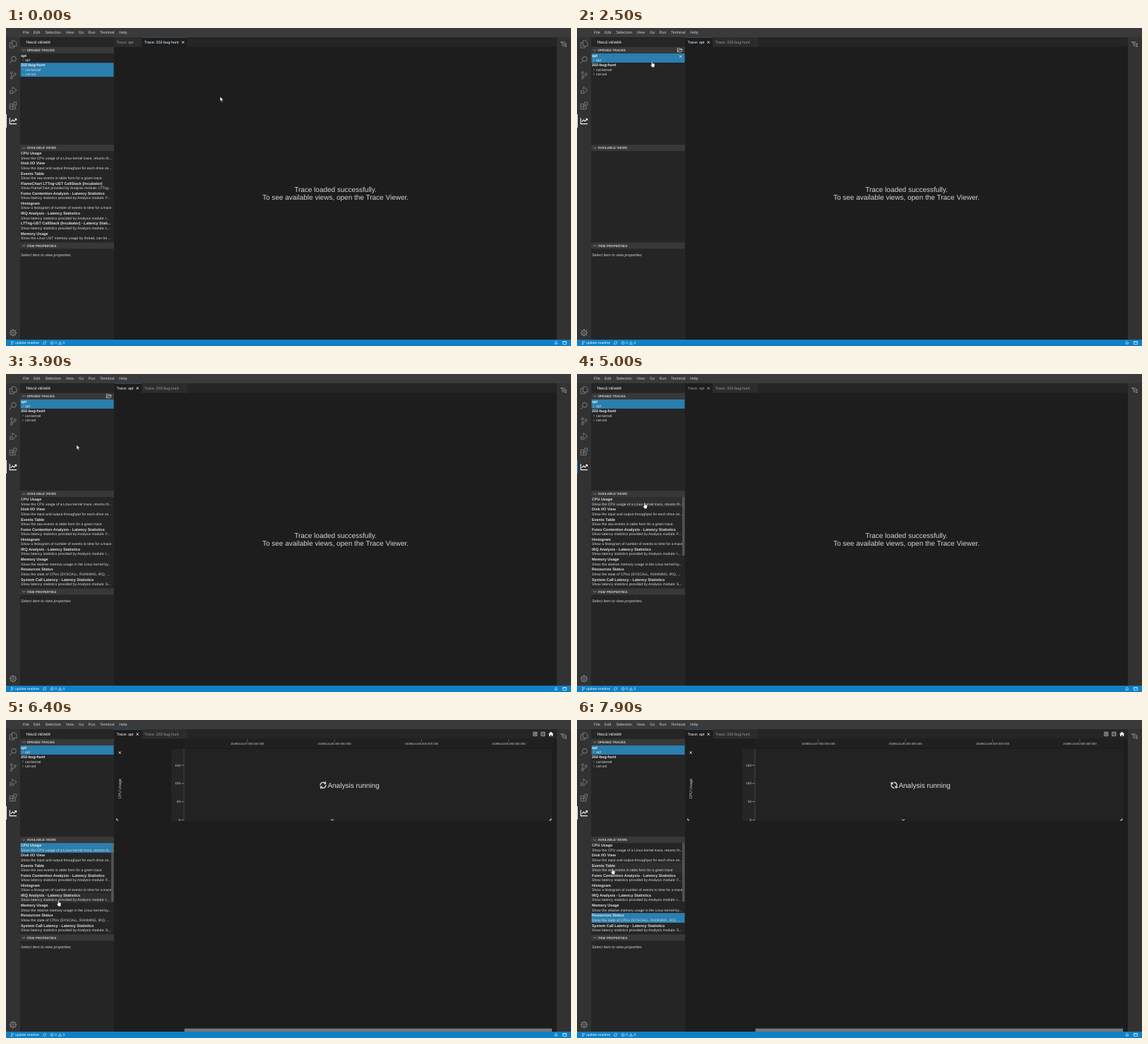
Write an HTML page that moves like this. It is 800 px wide and 450 px high and loops after 8000 ms.

```html
<!DOCTYPE html>
<html lang="en">
<head>
<meta charset="utf-8">
<title>Trace viewer</title>
<style>
html, body { margin: 0; width: 100%; height: 100%; overflow: hidden; background: #1e1d1e; }
svg { display: block; width: 100vw; height: 100vh; }
text { font-family: "Liberation Sans", Arial, sans-serif; white-space: pre; text-rendering: geometricPrecision; }
</style>
</head>
<body>
<svg id="stage" viewBox="0 0 800 450"></svg>
<script>
const LOOP = 8000;
const SELECT = '#2a7fae', HOVER = '#2c2e2f', PALE = '#cfcfcf', WHITE = '#f2f2f2';
const LIST_TOP = 173.9, ROW = 14.17;

// y is the vertical middle of the capitals
const text = (x, y, s, size = 5.42, fill = PALE, extra = '') =>
  `<text x="${x}" y="${(y + size * 0.36).toFixed(2)}" font-size="${size}" fill="${fill}" ${extra}>${s}</text>`;
const rect = (x, y, w, h, fill, extra = '') =>
  `<rect x="${x}" y="${y}" width="${w}" height="${h}" fill="${fill}" ${extra}/>`;
const line = (d, stroke = '#8a8a8a', width = 0.8, extra = '') =>
  `<path d="${d}" fill="none" stroke="${stroke}" stroke-width="${width}" ${extra}/>`;
const group = (id, body, extra = '') => `<g id="${id}" ${extra}>${body}</g>`;
const at = (x, y, body) => `<g transform="translate(${x} ${y})">${body}</g>`;
const cross = (x, y, r = 1.7, id = '') =>
  line(`M${x - r} ${y - r}l${2 * r} ${2 * r}m0 ${-2 * r}l${-2 * r} ${2 * r}`, WHITE, 0.9, id);
const BOLD = 'font-weight="bold"', MIDDLE = 'text-anchor="middle"';

function header(y, title) {
  return rect(20, y, 133, 9, '#383838') +
    line(`M23.2 ${y + 3.6}l2 2l2 -2`, '#c5c5c5', 0.6) +
    text(29.5, y + 4.5, title, 4.58, '#cccccc', BOLD);
}

function viewList(id, items) {
  return group(id, items.map(([name, about], i) => {
    const y = 177.3 + i * ROW;
    return text(21, y, name, 5.42, '#e4e4e4', BOLD) + text(21, y + 6.4, about, 5.1, '#dadada');
  }).join(''));
}

const cpu = ['CPU Usage', 'Show the CPU usage of a Linux kernel trace, returns th...'];
const disk = ['Disk I/O View', 'Show the input and output throughput for each drive on...'];
const events = ['Events Table', 'Show the raw events in table form for a given trace'];
const futex = ['Futex Contention Analysis - Latency Statistics', 'Show latency statistics provided by Analysis module: F...'];
const histogram = ['Histogram', 'Show a histogram of number of events to time for a trace'];
const irq = ['IRQ Analysis - Latency Statistics', 'Show latency statistics provided by Analysis module: I...'];
const huntViews = [cpu, disk, events,
  ['FlameChart LTTng-UST CallStack (Incubator)', 'Show FlameChart provided by Analysis module: LTTng...'],
  futex, histogram, irq,
  ['LTTng-UST CallStack (Incubator) - Latency Stati...', 'Show latency statistics provided by Analysis module: L...'],
  ['Memory Usage', 'Show the Linux UST memory usage by thread, can be ...']];
const aptViews = [cpu, disk, events, futex, histogram, irq,
  ['Memory Usage', 'Show the relative memory usage in the Linux kernel by...'],
  ['Resources Status', 'Show the state of CPUs (SYSCALL, RUNNING, IRQ, ...'],
  ['System Call Latency - Latency Statistics', 'Show latency statistics provided by Analysis module: S...']];

function chrome() {
  const menu = [[24, 'File'], [39, 'Edit'], [55.5, 'Selection'], [84.5, 'View'],
    [103, 'Go'], [116.5, 'Run'], [133, 'Terminal'], [160.3, 'Help']];
  return rect(0, 0, 800, 450, '#1e1d1e') + rect(0, 0, 800, 13, '#3b3a3b') +
    menu.map(([x, s]) => text(x, 6.4, s)).join('') +
    rect(0, 13, 20, 428, '#333233') + rect(780, 13, 20, 428, '#333233') +
    rect(20, 13, 133, 428, '#252526') + rect(153, 13, 627, 13.6, '#252526') +
    text(28, 19.9, 'TRACE VIEWER', 4.58, '#e2e2e2', 'stroke="#e2e2e2" stroke-width=".12"');
}

function activityIcons() {
  const gear = Array.from({ length: 8 }, (_, i) =>
    `<path d="M0 -3.3V-5" stroke="#8a8a8a" stroke-width="1.5" transform="rotate(${i * 45})"/>`).join('');
  return at(10, 23, line('M-1.5 -5h4l2.5 2.5v5h-6.5zM-2 -2.5h-2.7v7.5h6.2v-2')) +
    at(10, 45, '<circle cx="1" cy="-1.2" r="3.4" fill="none" stroke="#8a8a8a" stroke-width=".9"/>' + line('M-1.4 1.4L-5 5', '#8a8a8a', 1)) +
    at(10, 67, [[-2.2, -3.8], [-2.2, 3.8], [2.8, -1.8]].map(([x, y]) =>
      `<circle cx="${x}" cy="${y}" r="1.4" fill="none" stroke="#8a8a8a" stroke-width=".8"/>`).join('') +
      line('M-2.2 -2.4v4.8M2.8 -.4q0 2 -5 1.8')) +
    at(10, 88.5, line('M-1 -1.5v-3.5l6 4.5l-4.5 3.5') +
      '<circle cx="-2.2" cy="2" r="2" fill="none" stroke="#8a8a8a" stroke-width=".8"/>' +
      line('M-5 0l1.2 .8M-5 2.4h1M-5 4.8l1.3 -1M.6 4.8l-1.2 -1')) +
    at(10, 110, line('M-4.8 -2.6h4.2v7.4h-4.2zM-4.8 1h8v3.8h-4M.8 -5h4v4h-4z')) +
    at(10, 131.5, line('M-4.7 -4.2v8.3h9.7', WHITE, 1.1) + line('M-3 1.2l2.4 -2.6l2 1.8l3 -3.2M2.3 -3h2.3v2.3', WHITE, 1.2)) +
    at(10, 431.2, gear + '<circle r="3.6" fill="none" stroke="#8a8a8a" stroke-width=".8"/><circle r="1.4" fill="none" stroke="#8a8a8a" stroke-width=".8"/>') +
    at(790, 23, line('M-4 -3h6M-2 -3v5.2h4M-2 -.4h4', '#8a8a8a', 0.9) +
      [[-3.6, -3], [2.6, -.4], [2.6, 2.6]].map(([x, y]) => rect(x - .9, y - .9, 2, 2, '#8a8a8a')).join(''));
}

function statusBar() {
  return rect(0, 441, 800, 9, '#0f80c5') +
    at(9, 445.6, line('M-1 -2v4M-1 .8q2.3 0 2.3 -2', WHITE, 0.5) +
      [[-1, -2], [-1, 2], [1.3, -1.5]].map(([x, y]) => `<circle cx="${x}" cy="${y}" r=".65" fill="${WHITE}"/>`).join('')) +
    text(13, 445.6, 'update-readme', 5, WHITE) +
    at(54.6, 445.6, line('M-2 .4a2 2 0 0 1 3.5 -1.6M2 -.4a2 2 0 0 1 -3.5 1.6M1.8 -2v1.2h-1.2M-1.8 2v-1.2h1.2', WHITE, 0.5)) +
    at(65.2, 445.6, `<circle r="2.1" fill="none" stroke="${WHITE}" stroke-width=".5"/>` + line('M-.8 -.8l1.6 1.6m0 -1.6l-1.6 1.6', WHITE, 0.5)) +
    text(69.2, 445.6, '0', 5, WHITE) +
    at(76.4, 445.6, line('M0 -2l2.3 4h-4.6zM0 -.6v1.4', WHITE, 0.5)) +
    text(80.4, 445.6, '0', 5, WHITE) +
    at(778.8, 445.5, line('M-2 1.3q.7 -.7 .7 -2a1.3 1.3 0 0 1 2.6 0q0 1.3 .7 2zM-.5 2.2h1', WHITE, 0.6)) +
    at(791, 445.5, line('M-2.6 -1.9h5.2v3.9h-5.2zM-2.6 -1.2h5.2', WHITE, 0.7));
}

function tabs() {
  const tab = (id, x, w, title, closeX) => rect(x, 13, w, 13.6, '#2d2c2d', `id="${id}Bg"`) +
    rect(x, 13, w, 0.5, SELECT, `id="${id}Top"`) +
    text(x + 3.4, 20, title, 5.42, PALE, `id="${id}Text"`) + cross(closeX, 20.2, 1.6, `id="${id}Close"`);
  return tab('apt', 153, 39, 'Trace: apt', 186.2) + tab('hunt', 192.4, 63.6, 'Trace: 202-bug-hunt', 250.6);
}

function tree() {
  const leaf = (y, s) => line(`M23.2 ${y - 1.3}l1.3 1.3l-1.3 1.3`, '#d0d0d0', 0.5) + text(27, y, s, 5.1, '#dedede');
  return rect(20.5, 36, 132, 13, SELECT, 'id="traceSel"') +
    text(21, 39.2, 'apt', 5.42, '#ececec', BOLD) + leaf(45.4, 'apt') +
    text(21, 52.3, '202-bug-hunt', 5.42, '#ececec', BOLD) + leaf(58.8, 'cat-kernel') + leaf(65.4, 'cat-ust') +
    group('folder', line('M142.3 33.8v-5.2h2.4l.8 .9h3v1.3M142.3 33.8l1.6 -3h5.4l-1.6 3z', '#d8d8d8', 0.7)) +
    group('closeTrace', cross(146.6, 40.3, 1.6));
}

function chart() {
  const times = [147, 148, 149, 150].map((n, i) => {
    const x = 341.6 + i * 123.4;
    return line(`M${x} 26.8v4.4`, '#777', 0.6) +
      text(x, 33.7, `1538614${n}.000 000 000`, 4.17, '#cfcfcf', MIDDLE);
  }).join('');
  const scale = [150, 100, 50, 0].map((n, i) => {
    const y = 64 + i * 25.8;
    return text(247, y, n, 4.7, '#d8d8d8', 'text-anchor="end"') + line(`M248.2 ${y}h3.4`, '#c8c8c8', 0.6);
  }).join('');
  const box = x => line(`M${x - 2.5} 17.3h5v5h-5zM${x - 1.3} 19.8h2.6`, WHITE, 0.7);
  return rect(153, 26.6, 627, 414, '#1e1d1e') +
    rect(252.4, 26.6, 521, 12.2, '#212021') + times +
    rect(234, 41, 539, 102, '#232223') + rect(234, 41, 18.4, 102, '#262526') +
    rect(250.4, 41, 2.4, 102, '#2b3436', 'id="axisBar"') +
    group('scale', line('M252 41v101', '#5d6264', 0.5) + scale) +
    cross(161.2, 46.2, 1.7) +
    text(0, 0, 'CPU Usage', 5.42, '#d6d6d6', `${MIDDLE} transform="translate(161.2 97.3) rotate(-90)"`) +
    line('M156.8 139.2v2.6h2.3M771.7 139.2v2.6h-2.6', WHITE, 0.9) +
    line('M460 140.4l2 1.8l2 -1.8', WHITE, 0.9) +
    text(455.4, 92.4, 'Analysis running', 10, '#dddddd') +
    group('spinner', ['', 'rotate(180)'].map(r => `<g transform="${r}">` +
      line('M-3.9 -.8A4 4 0 0 1 3 -2.7', '#dddddd', 1.4) +
      '<path d="M4.9 -4.6V-.6H.9z" fill="#dddddd"/></g>').join('')) +
    box(749.3) + line('M749.3 18.5v2.6', WHITE, 0.7) + box(760.3) +
    `<path d="M771.6 16.6l3.7 3.5h-1.1v2.8h-1.8v-2h-1.6v2h-1.8v-2.8h-1.1z" fill="${WHITE}"/>` +
    rect(252.6, 436.6, 520.4, 4.4, '#787778');
}

const pointers =
  group('arrow', '<path d="M0 0V6.2L1.5 4.9L2.6 7.5L3.6 7L2.5 4.6H4.4Z" fill="#fff" stroke="#111" stroke-width=".3"/>') +
  group('hand', '<path d="M1.4 .6Q2.1 -.2 2.7 .6V3L5.2 3.6Q6 3.9 5.8 5L5.3 8.6H2L.1 5.6Q-.1 4.6 .8 4.8L1.4 5.3Z" fill="#fff" stroke="#111" stroke-width=".35"/>');

document.getElementById('stage').innerHTML = chrome() + tabs() +
  text(466.5, 228.2, 'Trace loaded successfully.', 10, '#d4d4d4', MIDDLE) +
  text(466.5, 239.7, 'To see available views, open the Trace Viewer.', 10, '#d4d4d4', MIDDLE) +
  rect(0, 122, 1, 19, WHITE, 'id="focusBar"') + activityIcons() +
  header(26.8, 'OPENED TRACES') + tree() +
  rect(20.5, 0, 132, ROW, HOVER, 'id="rowHover"') + rect(20.5, 0, 132, 13.9, SELECT, 'id="rowSel"') +
  viewList('huntList', huntViews) + viewList('aptList', aptViews) +
  rect(149, 174, 3.6, 83, '#6a6a6a', 'id="scrollbar" opacity=".65"') +
  header(165.1, 'AVAILABLE VIEWS') + header(303.4, 'ITEM PROPERTIES') +
  text(21, 321, 'Select item to view properties', 5.42, '#d4d4d4', 'font-style="italic"') +
  group('chart', chart()) + statusBar() + pointers;

const el = {};
document.querySelectorAll('[id]').forEach(node => { el[node.id] = node; });
const show = (id, on) => el[id].setAttribute('display', on ? 'inline' : 'none');
const set = (id, name, value) => el[id].setAttribute(name, value);

// start, end, then the place reached
const moves = [
  [100, 1000, 358.3, 107.3], [1199, 1200, 399.6, 150.2], [1700, 2350, 104.2, 47],
  [3600, 4300, 93.6, 182], [5500, 5700, 93.6, 190], [5800, 6700, 64.6, 277.8],
  [7400, 7900, 48, 210]];

function pointerAt(t) {
  let x = 303.2, y = 97.2;
  for (const [start, end, toX, toY] of moves) {
    const u = Math.min(1, Math.max(0, (t - start) / (end - start)));
    const k = u * u * (3 - 2 * u);
    x += (toX - x) * k;
    y += (toY - y) * k;
  }
  return [x, y];
}

function paintTab(id, active, focused) {
  set(id + 'Bg', 'fill', active ? '#1e1d1e' : '#2d2c2d');
  set(id + 'Text', 'fill', active && focused ? '#ffffff' : '#9a9a9a');
  show(id + 'Top', active && focused);
  show(id + 'Close', active);
  set(id + 'Close', 'stroke', focused ? WHITE : '#b0b0b0');
}

function render(t) {
  const [x, y] = pointerAt(t);
  const onApt = t >= 2500, listed = t >= 3300, opened = t >= 5500;
  const sideFocus = (t >= 5000 && t < 5500) || (t >= 6900 && t < 7400);
  const inSide = x > 20 && x < 151;
  const inList = inSide && listed && y >= LIST_TOP && y < 302;
  const inTree = inSide && y > 36 && y < 69;

  paintTab('apt', onApt, !sideFocus);
  paintTab('hunt', !onApt, !sideFocus);
  set('focusBar', 'fill', sideFocus ? '#1787cf' : WHITE);

  set('traceSel', 'y', onApt ? 36 : 49.3);
  set('traceSel', 'height', onApt ? 13 : 19.7);
  show('folder', inSide && y > 27 && y < 165);
  show('closeTrace', inTree && y < 49.3);

  show('huntList', !onApt);
  show('aptList', listed);
  show('scrollbar', inList);
  show('rowHover', inList);
  set('rowHover', 'y', LIST_TOP + Math.floor((y - LIST_TOP) / ROW) * ROW);
  show('rowSel', t >= 5200);
  set('rowSel', 'y', LIST_TOP + (t < 7300 ? 0 : 7) * ROW);

  show('chart', opened);
  show('scale', t >= 6100);
  show('axisBar', t < 6100);
  set('spinner', 'transform', `translate(449 92.2) rotate(${(t - 5500) * 0.18})`);

  show('hand', inTree || inList);
  show('arrow', !(inTree || inList));
  const place = `translate(${x.toFixed(2)} ${y.toFixed(2)})`;
  set('hand', 'transform', place);
  set('arrow', 'transform', place);
}

const began = performance.now();
function tick() {
  render((performance.now() - began) % LOOP);
  requestAnimationFrame(tick);
}
tick();
</script>
</body>
</html>
```
